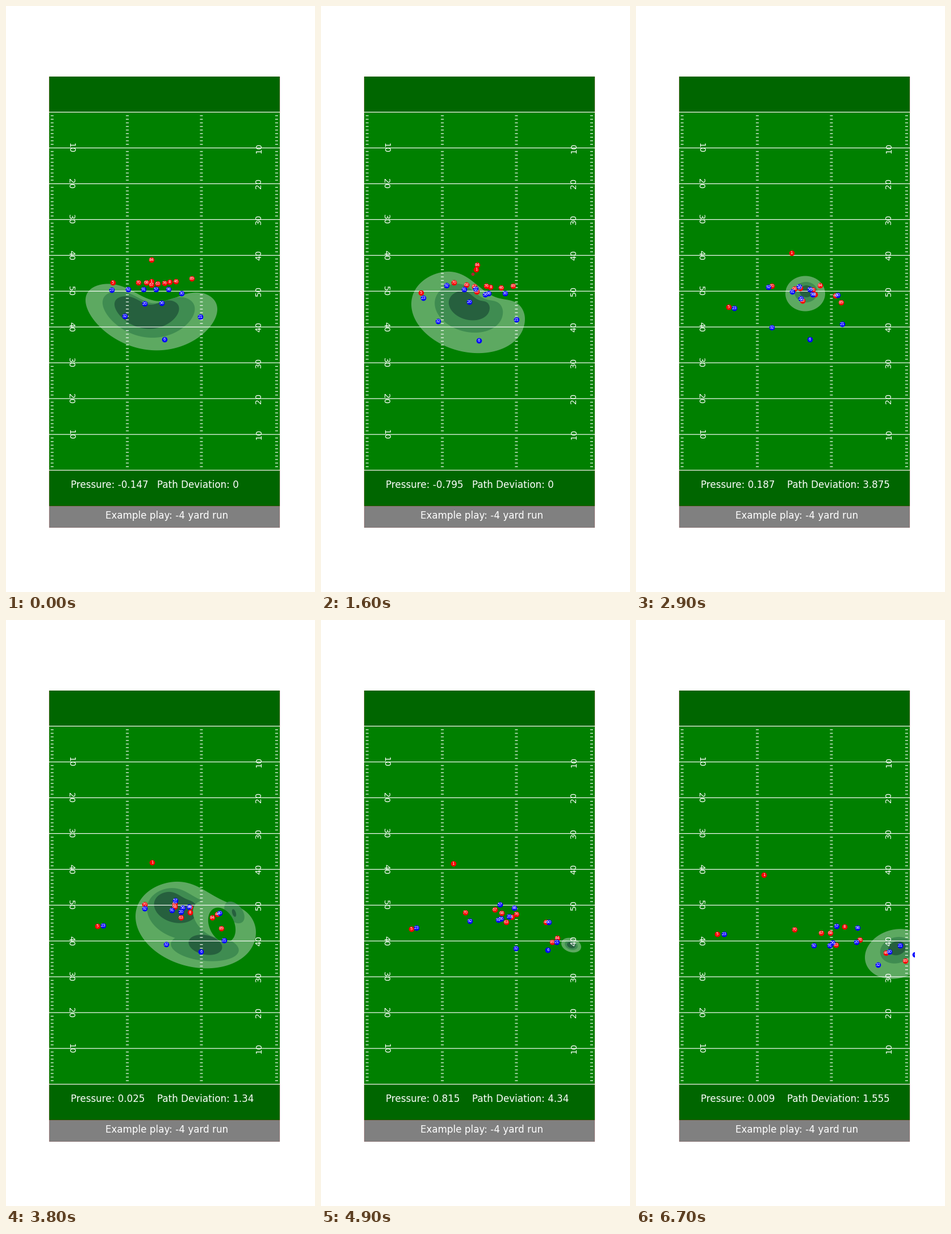
Write a matplotlib script that moves like this. It is 544 px wide and 1030 px high and loops after 6800 ms.

```python
import numpy as np
import matplotlib.pyplot as plt
from matplotlib.animation import FuncAnimation
from matplotlib.patches import Polygon, Rectangle

W, H, DPI = 544, 1030, 100
FRAMES, STEP = 68, 100
LEFT, RIGHT, TOP, BOTTOM = 68.0, 489.6, 123.6, 916.7
YX = (RIGHT - LEFT) / 55.3      # pixels per yard across the field
YY = (BOTTOM - TOP) / 126       # pixels per yard along the field
FONT, LINE = 12.03, 0.86        # caption size and line width in points
GREEN = "green"
SHADES = ["#5da961", "#3f8c51", "#26603e"]
KEYS = [0, 1600, 2900, 3800, 4900, 5600, 6700]
HOLD = 800                      # the shading stays put until here
SNAP, BEAT = 1000, 1900         # snap time, then three equal beats of play
SPLIT = 3800                    # moment when the shading breaks apart


def px(x):
    return LEFT + (x + 1) * YX


def py(y):
    return TOP + (120 - y) * YY


fig = plt.figure(figsize=(W / DPI, H / DPI), dpi=DPI, facecolor="white")
ax = fig.add_axes([LEFT / W, 1 - BOTTOM / H, (RIGHT - LEFT) / W, (BOTTOM - TOP) / H])
ax.set_xlim(LEFT, RIGHT)
ax.set_ylim(BOTTOM, TOP)
ax.axis("off")


# ---- field ----
def band(y0, y1, color):
    return ax.add_patch(Rectangle((px(0), py(y1)), px(53.3) - px(0), py(y0) - py(y1),
                                  fc=color, ec="red", lw=0.1, zorder=0))


def stripe(x0, x1, yard):
    ax.plot([px(x0), px(x1)], [py(yard)] * 2, color="white", lw=LINE,
            solid_capstyle="butt", snap=False, zorder=2)


field = band(0, 120, GREEN)
band(110, 120, "#006600")
band(0, 10, "#006600")
band(-6, 0, "gray")

for yard in range(10, 111):
    if yard % 10 == 0:
        stripe(0, 53.3, yard)
    else:
        for x in (0.4, 17.77):
            stripe(x, x + 0.66, yard)
            stripe(53.3 - x - 0.66, 53.3 - x, yard)

for yard in range(20, 101, 10):
    for x, turn in ((114, 270), (445.2, 90)):
        ax.text(x, py(yard), str(min(yard - 10, 110 - yard)), color="white",
                fontsize=10.3, rotation=turn, ha="center", va="center", zorder=2.5)


def caption(x, y, s=""):
    return ax.text(px(x), py(y), s, color="white", fontsize=FONT, zorder=5)


caption(13, -3.5, "Example play: -4 yard run")
pressure_text = caption(5, 5)
deviation_text = caption(25, 5)
PRESSURE = [-0.147, -0.795, 0.187, 0.025, 0.815, 1.658, 0.009]
DEVIATION = [0, 0, 3.875, 1.34, 4.34, 3.377, 1.555]


# ---- shading: three nested rounds, each `ratio` times the size of the last ----
def blob(cx, cy, rx, ry, tilt=0, bend=0, dent=0, lean=0, dx=0, dy=0, ratio=0.6):
    return cx, cy, rx, ry, tilt, bend, dent, lean, dx, dy, ratio


BLOBS = np.array([
    blob(256, 545, 116, 60, tilt=8, bend=20, dent=33, lean=0.1, dx=-16, dy=-14, ratio=0.7),
    blob(259, 537, 100, 72, tilt=13, dent=36, lean=0.5, dx=3, dy=-17),
    blob(298, 505.5, 35, 31, dx=3, dy=-6, ratio=0.58),
    blob(334, 535, 106, 76, tilt=14, dent=22, lean=0.5, dx=-55, dy=-47),
    blob(440.5, 571.5, 17.5, 12.5, tilt=3, ratio=0.65),
    blob(471, 574.7, 17, 12, ratio=0.63),
    blob(458, 587, 55, 43.5, tilt=-6, dx=2, dy=-14, ratio=0.53),
])
ANGLE = np.linspace(0, 2 * np.pi, 160, endpoint=False)
COS, SIN = np.cos(ANGLE), np.sin(ANGLE)


def ring(level, cx, cy, rx, ry, tilt, bend, dent, lean, dx, dy, ratio):
    k = ratio ** level
    notch = dent * np.exp(-((COS - lean) / 0.5) ** 2) * np.maximum(0, -SIN)
    x = rx * COS
    y = ry * SIN + tilt * COS - bend * COS ** 2 + notch
    return np.column_stack([cx + (1 - k) * dx + k * x, cy + (1 - k) * dy + k * y])


def ellipse(cx, cy, rx, ry, degrees):
    a = np.radians(degrees)
    x, y = rx * COS, ry * SIN
    return np.column_stack([cx + x * np.cos(a) - y * np.sin(a),
                            cy + x * np.sin(a) + y * np.cos(a)])


def region(color):
    patch = ax.add_patch(Polygon([(0, 0), (0, 1), (1, 1)], fc=color, lw=0, zorder=1))
    patch.set_clip_path(field)
    return patch


rings = [region(c) for c in SHADES]
islands = [(region(color), ellipse(*shape)) for color, *shape in [
    (SHADES[1], 350, 575, 60, 24, 6),
    (SHADES[0], 365, 526, 41, 27, 40),
    (SHADES[2], 351, 571, 30, 17, 12),
    (SHADES[1], 402, 514, 22, 14, 50),
    (GREEN, 380, 536, 22, 32, -25),
    (SHADES[2], 401.5, 515, 7, 3.2, 72),
]]


# ---- players: a cubic path through four points, one per beat ----
class Team:
    def __init__(self, color):
        self.dots = ax.scatter([], [], s=48, color=color, lw=0, zorder=3)
        self.paths, self.tags = [], []

    def add(self, number, *pts):
        self.paths.append(np.array(pts, float))
        self.tags.append(ax.text(0, 0, str(number), color="white", fontsize=5.1,
                                 ha="center", va="center", clip_on=True, zorder=4))

    def place(self, t):
        u = max(0, t - SNAP) / BEAT
        weights = [np.prod([(u - j) / (i - j) for j in range(4) if j != i])
                   for i in range(4)]
        spots = np.array([weights @ p for p in self.paths])
        self.dots.set_offsets(spots)
        for tag, spot in zip(self.tags, spots):
            tag.set_position(spot)
        return spots


ball = ax.scatter([], [], s=18, color="brown", lw=0, zorder=3)
BALL_START = np.array([258, 491])

red = Team("red")
red.add(84, (256, 446), (324, 491), (411, 556), (512, 588))
red.add(5, (188, 486), (163, 529), (159, 543), (143, 552))
red.add(70, (233, 486), (239, 492), (253, 513), (279, 544))
red.add(68, (247, 486), (279, 497), (316, 514), (342, 550))
red.add(1, (256, 484), (274, 434), (235, 427), (225, 448))
red.add(67, (256, 490), (289, 496), (305, 508), (326, 550))
red.add(63, (267, 488), (293, 518), (324, 530), (352, 571))
red.add(8, (288, 485), (315, 507), (335, 521), (367, 539))
red.add(76, (279, 487), (311, 499), (342, 516), (394, 562))
red.add(46, (299, 484), (351, 509), (394, 529), (440, 585))
red.add(89, (327, 479), (361, 521), (404, 564), (474, 599))

blue = Team("blue")
blue.add(23, (186, 499), (173, 531), (168, 541), (155, 552))
blue.add(92, (215, 498), (233, 494), (260, 527), (313, 572))
blue.add(91, (242, 498), (275, 502), (310, 525), (341, 572))
blue.add(57, (264, 498), (287, 493), (313, 499), (353, 538))
blue.add(98, (286, 498), (311, 507), (338, 505), (390, 541))
blue.add(30, (309, 505), (355, 508), (399, 529), (446, 583))
blue.add(56, (274, 522), (306, 498), (316, 523), (346, 567))
blue.add(20, (244, 523), (290, 514), (329, 520), (388, 566))
blue.add(32, (209, 545), (239, 565), (337, 576), (426, 606))
blue.add(21, (342, 546), (363, 559), (412, 566), (465, 572))
blue.add(6, (279, 586), (306, 586), (394, 580), (491, 588))


def draw(i):
    t = i * STEP
    pressure = np.interp(t, KEYS, PRESSURE)
    deviation = np.interp(t, KEYS, DEVIATION)
    pressure_text.set_text(f"Pressure: {round(pressure, 3):g}")
    deviation_text.set_text(f"Path Deviation: {round(deviation, 3):g}")

    shape = [np.interp(t, [HOLD] + KEYS[1:], column) for column in BLOBS.T]
    for level, patch in enumerate(rings):
        patch.set_xy(ring(level, *shape))
    grow = max(0, 1 - abs(t - SPLIT) / 450) ** 0.6
    for patch, pts in islands:
        mid = pts.mean(axis=0)
        patch.set_xy(mid + (pts - mid) * grow)
        patch.set_visible(grow > 0)

    runner = red.place(t)[0]
    blue.place(t)
    handoff = np.clip((t - SNAP) / 1100, 0, 1)
    ball.set_offsets([BALL_START + handoff * (runner - BALL_START)])
    return []


anim = FuncAnimation(fig, draw, frames=FRAMES, init_func=lambda: draw(0),
                     interval=STEP, repeat=True, repeat_delay=0)
plt.show()
```
